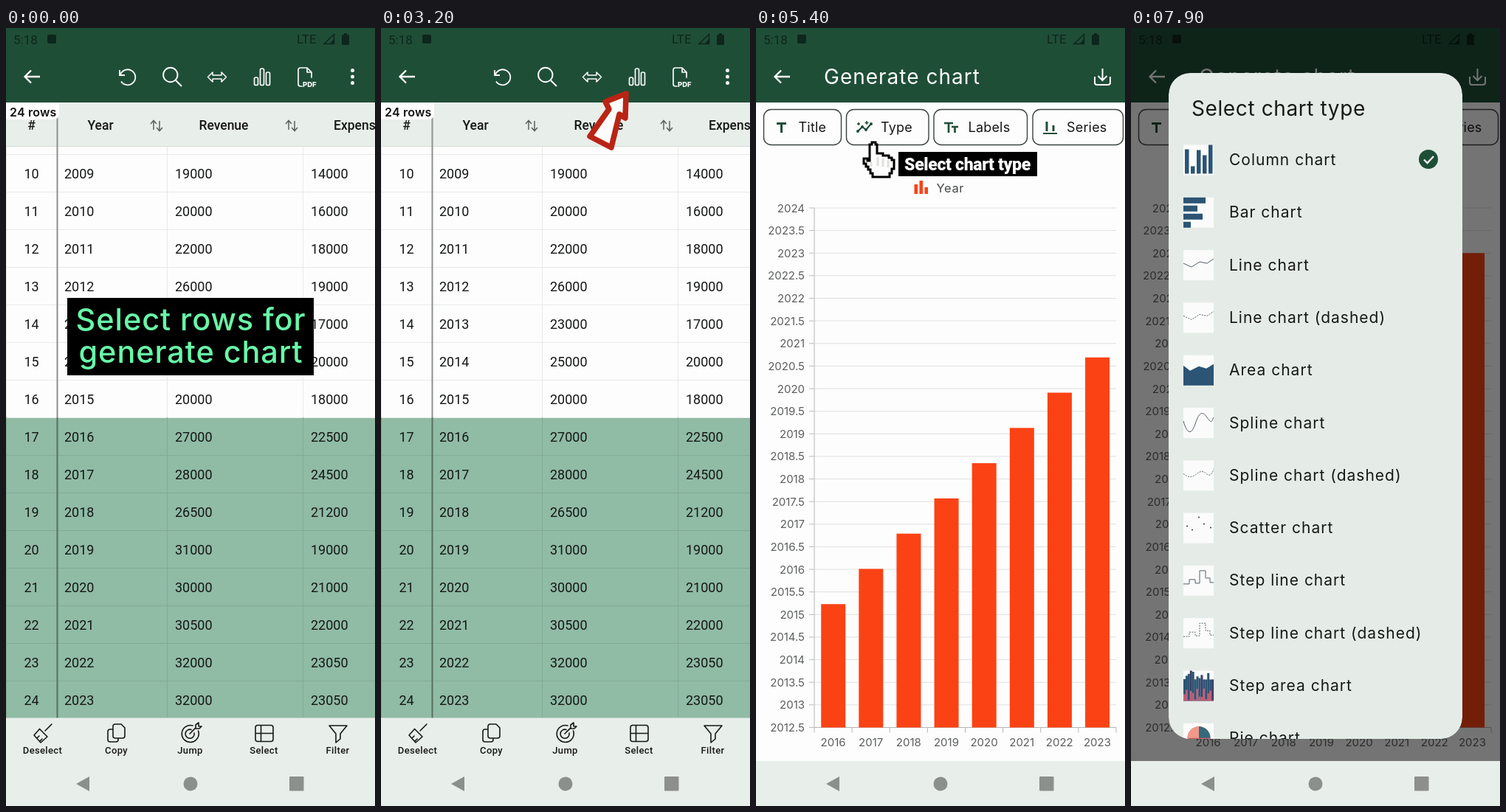
Write an HTML page that moves like this. It is 500 by 1055 pixels and loops after 8 s.

```html
<!DOCTYPE html>
<html lang="en">
<head>
<meta charset="utf-8">
<title>Generate chart</title>
<style>
html, body { margin: 0; width: 100%; height: 100%; overflow: hidden; background: #fdfdfd; }
svg { display: block; width: 100vw; height: 100vh; }
text { white-space: pre; }
.ui { font-family: Inter, sans-serif; }
.rb { font-family: Roboto, sans-serif; }
</style>
</head>
<body>
<script>
const GREEN = '#1f4e37', WHITE = '#fdfdfd', PANEL = '#e8eeea', INK = '#151816';
const BAR = '#fb4214', NAVY = '#2b5475', GREY = '#8b908c';
const LOOP = 8000;

const each = (list, fn) => list.map(fn).join('');
const range = (n, fn) => each([...Array(n).keys()], fn);
const rect = (x, y, w, h, fill, more = '') =>
  `<rect x="${x}" y="${y}" width="${w}" height="${h}" fill="${fill}" ${more}/>`;
const dot = (x, y, r, fill, more = '') =>
  `<circle cx="${x}" cy="${y}" r="${r}" fill="${fill}" ${more}/>`;
const line = (d, color, w = 1, more = '') =>
  `<path d="${d}" fill="none" stroke="${color}" stroke-width="${w}" ${more}/>`;
const shape = (d, fill, more = '') => `<path d="${d}" fill="${fill}" ${more}/>`;
const text = (x, y, s, size, fill, more = '', font = 'ui') =>
  `<text class="${font}" x="${x}" y="${y}" font-size="${size}" fill="${fill}" ${more}>${s}</text>`;
const group = (id, body, more = '') => `<g id="${id}" ${more}>${body}</g>`;
const MID = 'text-anchor="middle"', END = 'text-anchor="end"';
const ROUND = 'stroke-linecap="round" stroke-linejoin="round"';

// Shared phone chrome
const statusBar = () => {
  const ink = '#0e261b';
  return rect(0, 0, 500, 101, GREEN)
    + text(10, 22, '5:18', 17, ink, '', 'rb')
    + rect(56, 9, 12, 12, ink, 'rx="2"')
    + text(394, 21, 'LTE', 17, ink, '', 'rb')
    + line('M431 21.5H444.5V8.5Z', ink, 1.5) + shape('M438 22H445V14Z', ink)
    + rect(455, 9, 10, 14, ink, 'rx="1.5"') + rect(458, 7, 4, 3, ink);
};
const backArrow = line('M46 66H26M34 57.5L25.5 66L34 74.5', WHITE, 2.3);
const navBar = y => rect(0, y, 500, 1055 - y, PANEL)
  + shape('M95 1025L113 1015V1035Z', GREY)
  + dot(250, 1025, 9.5, GREY)
  + rect(384, 1015, 19.5, 19.5, GREY, 'rx="1"');

// Table screen
const revenue = [19, 20, 22, 26, 23, 25, 20, 27, 28, 26.5, 31, 30, 30.5, 32, 32];
const expense = [14, 16, 18, 19, 17, 20, 18, 22.5, 24.5, 21.2, 19, 21, 22, 23.05, 23.05];

const toolbar = line('M154 57V64H161M155 63A10.5 10.5 0 1 1 156 72.5', WHITE, 1.8)
  + line('M230 71L238 79', WHITE, 1.9) + dot(222.8, 63.5, 9.7, 'none', `stroke="${WHITE}" stroke-width="1.9"`)
  + line('M273.5 66.5L280 60V64H292V60L298.5 66.5L292 73V69H280V73Z', WHITE, 1.5, ROUND)
  + each([[336.5, 67], [344.5, 55], [352.5, 60]], ([x, y]) =>
      rect(x, y, 5, 77.5 - y, 'none', `rx="2" stroke="${WHITE}" stroke-width="1.7"`))
  + line('M401 79H399A3 3 0 0 1 396 76V57A3 3 0 0 1 399 54H408L414 60V67M408 54V60H414', WHITE, 1.7, ROUND)
  + text(402, 80, 'PDF', 9.5, WHITE, 'font-weight="800"')
  + each([57.5, 66, 74.5], y => dot(469.5, y, 2.5, WHITE));

const sortIcon = x => line(
  `M${x - 4} 138V125.5M${x - 8} 130L${x - 4} 125.5L${x} 130M${x + 4} 126V139.5M${x} 135L${x + 4} 139.5L${x + 8} 135`,
  '#5c615d', 1.5);

const tableGrid = () => {
  const rule = '#e6eae6', shade = '#82ab94';
  return rect(0, 160, 500, 776, WHITE) + rect(0, 528, 500, 408, '#90bba5')
    + range(15, i => line(`M0 ${171.5 + 51 * i}H500`, i > 7 ? shade : rule))
    + each([.5, 218.5, 402.5], x => line(`M${x} 160V528`, rule) + line(`M${x} 528V936`, shade))
    + range(15, i => {
        const cell = (x, s, more) => text(x, 203.5 + 51 * i, s, 18, INK, more, 'rb');
        return cell(34.5, 10 + i, MID) + cell(79, 2009 + i)
          + cell(229, revenue[i] * 1000) + cell(413, expense[i] * 1000);
      });
};

const heading = (x, s, more = '') => text(x, 137.5, s, 17.5, INK, more + ' font-weight="500"', 'rb');
const tableHead = rect(0, 101, 500, 59.5, PANEL) + line('M0 160.5H500', '#d8ded9')
  + heading(34.5, '#', MID) + heading(128, 'Year', MID) + heading(295, 'Revenue', MID)
  + heading(444, 'Expenses')
  + sortIcon(204) + sortIcon(387)
  + line('M69.5 101V528', '#8d918e', 2) + line('M69.5 528V936', '#56705f', 2)
  + shape('M0 101H72V116Q72 124 64 124H0Z', WHITE)
  + text(5, 119.5, '24 rows', 16, '#111', 'font-weight="600" letter-spacing=".2"');

const actions = [
  ['Deselect', 'M62 944L53 953M45.5 950.5L56 961M45.5 950.5L38 959L47 969L56 961M42 963L45 960M46 967L49 964'],
  ['Copy', 'M148 944H156L161 949V960A3 3 0 0 1 158 963H148A3 3 0 0 1 145 960V947A3 3 0 0 1 148 944M145 951H141A3 3 0 0 0 138 954V965A3 3 0 0 0 141 968H149A3 3 0 0 0 152 965V963'],
  ['Jump', 'M253 946A11.5 11.5 0 1 0 260.5 953M251 951.5A6 6 0 1 0 255 956M249 957L257 949V945L261 942V947H265L262 950H257'],
  ['Select', 'M341 945.5H359A3 3 0 0 1 362 948.5V964.5A3 3 0 0 1 359 967.5H341A3 3 0 0 1 338 964.5V948.5A3 3 0 0 1 341 945.5M345.5 945.5V967.5M338 956.5H362'],
  ['Filter', 'M438 946H462L453 957V964L447 969V957Z'],
];
const actionBar = rect(0, 935.5, 500, 70, PANEL)
  + each(actions, ([name, icon], i) => line(icon, INK, 1.6, ROUND)
    + text(49.5 + 100 * i, 984, name, 13, INK, MID + ' font-weight="500" letter-spacing=".35"', 'rb'));

const tableScreen = tableGrid() + tableHead + statusBar() + backArrow + toolbar + navBar(1000) + actionBar;

const caption = rect(83, 366, 334, 105, '#000')
  + each([['Select rows for', 409.5], ['generate chart', 454]], ([s, y]) =>
      text(250.5, y, s, 41.5, '#68f7a8', MID + ' font-weight="500" letter-spacing=".9"'));

const pointer = shape('M332 89L304 100L309 110L283 147L312 162L323 117L331 122Z', WHITE,
  'stroke="#b92414" stroke-width="7.5" stroke-linejoin="round"');

// Chart screen
const BASE = 948.5, STEP = 704.5 / 23, SLOT = 409 / 8;

const chip = (x, w, label, tx) =>
  rect(x, 110.5, w, 48, 'none', 'rx="10" stroke="#3c4440" stroke-width="1.4"')
  + text(tx, 141, label, 18, INK, 'letter-spacing=".2"');
const chips = chip(10.5, 105, 'Title', 57.5) + chip(122.5, 111.5, 'Type', 169)
  + chip(241, 126.5, 'Labels', 287.5) + chip(375, 122.5, 'Series', 421)
  + line('M28 129.5H41M34.5 129.5V142', GREEN, 3)
  + line('M138 140L144 134L149 138L156 130', GREEN, 2, ROUND)
  + each([[138, 140], [144, 134], [149, 138], [156, 130]], ([x, y]) => dot(x, y, 2, GREEN))
  + line('M139 128V132M137 130H141M150 126V131M147.5 128.5H152.5', GREEN, 1.5)
  + line('M255 129H267M261 129V142M265 134H274M269.5 134V142', GREEN, 2.7)
  + line('M389 143H408', GREEN, 2) + line('M394 127V140M403 132V140', GREEN, 3);

const axisText = (x, y, s, more) => text(x, y, s, 15, '#5c605d', more);
const axes = range(24, i => {
    const y = BASE - STEP * i;
    return line(`M79 ${y}H488`, '#dde0dd') + line(`M72 ${y}H79`, '#b9bcb9')
      + axisText(66, y + 5.5, 2012.5 + i / 2, END);
  })
  + line(`M79 244V${BASE}`, '#c8ccc8', 1.5)
  + line(`M79 ${BASE}H488`, '#b4b6b4', 1.2)
  + range(9, i => line(`M${79 + SLOT * i} ${BASE}v7`, '#b4b6b4'))
  + range(8, i => axisText(79 + SLOT * (i + .5), 974, 2016 + i, MID));

const chartScreen = rect(0, 0, 500, 1055, WHITE) + statusBar() + backArrow
  + text(92, 76, 'Generate chart', 28, WHITE, 'letter-spacing="1"')
  + line('M459 66V74A3 3 0 0 0 462 77H477A3 3 0 0 0 480 74V66M469.5 55V70M463.5 65L469.5 71L475.5 65', WHITE, 2)
  + chips
  + rect(214.5, 212, 4.5, 13, BAR) + rect(221.5, 207, 4.5, 18, BAR) + rect(228.5, 216, 4.5, 9, BAR)
  + text(244.5, 222.5, 'Year', 16.5, '#464a47', 'letter-spacing=".6"')
  + axes
  + range(8, i => rect(88.2 + SLOT * i, BASE, 33, 0, BAR, 'class="bar"'))
  + navBar(994);

// Chart type dialog
const curve = (d, more) => line(d, '#55606a', 1, more);
const DASH = 'stroke-dasharray="2 1.5"';
const lineD = 'M0 18L11 23L22 16L32 18L41 12';
const stepD = 'M0 25H8V19H16V24H22V7H30V17H36V23H41';
const types = [
  ['Column chart', each([[2, 33], [10, 10], [18, 32], [26, 25], [34, 39]], ([x, h]) => rect(x, 39 - h, 5.5, h, NAVY))],
  ['Bar chart', each([30, 19, 26, 10], (w, i) => rect(0, 11 * i, w, 8, NAVY))],
  ['Line chart', curve(lineD)],
  ['Line chart (dashed)', curve(lineD, DASH)],
  ['Area chart', shape('M0 14L9 21L21 15L31 18L41 12V41H0Z', NAVY)],
  ['Spline chart', curve('M0 18C5 36 11 37 16 22S25 3 32 13S38 18 41 13')],
  ['Spline chart (dashed)', curve('M0 18Q9 26 17 19T31 18T41 12', DASH)],
  ['Scatter chart', each([[5, 18], [12, 23], [21, 6], [28, 15], [37, 20]], ([x, y]) => dot(x, y, 1, '#333'))],
  ['Step line chart', curve(stepD)],
  ['Step line chart (dashed)', curve(stepD, DASH)],
  ['Step area chart', range(14, i => {
    const top = 6 + 6 * Math.sin(i * i + 2), red = 9 + 8 * Math.sin(i * 2.3);
    return rect(i * 2.93, top, 3, 41 - top, i % 5 == 3 ? '#3d3f63' : NAVY)
      + rect(i * 2.93, 41 - red, 3, red, '#bf6078');
  })],
  ['Pie chart', dot(21, 20, 15.5, '#d0606a') + shape('M21 20V4.5A15.5 15.5 0 0 0 5.5 20Z', '#f0988a')
    + shape('M21 20V4.5A15.5 15.5 0 0 1 36.5 20Z', '#346a7c')],
];
const dialog = rect(51, 61, 398, 903, '#e5ece8', 'rx="29"')
  + text(82, 119, 'Select chart type', 28, INK, 'letter-spacing=".6"')
  + each(types, ([name, icon], i) => {
      const y = 179 + 71.3 * i;
      return `<g transform="translate(71 ${y - 20.5})">${rect(0, 0, 41, 41, '#fafbfa')}${icon}</g>`
        + text(133, y + 7, name, 21, INK, 'letter-spacing="1"');
    })
  + dot(403, 178, 13, GREEN) + line('M397 178.5L401.5 183L410 174', WHITE, 2.3);

const hand = shape('M157 155H162V158H164V170H172V173H180V176H184V179H187V191H184V197H181V202H158V197H155V192H152V188H149V184H146V177H151V180H154V158H157Z',
    WHITE, 'stroke="#000" stroke-width="3"')
  + line('M165 175V187M172 177V188M179 179V189M156 182V188', '#dfe0dc', 3)
  + rect(193, 168, 188, 33, '#000')
  + text(286.5, 192.5, 'Select chart type', 23, '#fff', MID + ' font-weight="800" letter-spacing="-.35"', 'rb');

document.body.innerHTML = `<svg viewBox="0 0 500 1055" preserveAspectRatio="none">
  <clipPath id="panel">${rect(51, 61, 398, 903, '#fff', 'rx="29"')}</clipPath>
  ${tableScreen}${group('caption', caption)}${group('pointer', pointer)}
  ${group('chart', chartScreen)}${rect(0, 0, 500, 994, '#000', 'id="dim"')}
  ${group('dialog', dialog, 'clip-path="url(#panel)"')}${group('hand', hand)}
</svg>`;

const el = id => document.getElementById(id);
const bars = document.querySelectorAll('.bar');
const fade = (id, a) => {
  el(id).style.opacity = a;
  el(id).style.display = a > 0 ? '' : 'none';
};
const part = (t, start, span) => Math.min(1, Math.max(0, (t - start) / span));

function draw(now) {
  const t = now % LOOP;
  fade('caption', +(t < 2200));
  fade('pointer', +(t >= 2200 && t < 4250));
  fade('chart', part(t, 4050, 200));
  fade('hand', +(t >= 4400 && t < 7300));

  const grow = 1 - (1 - part(t, 4254, 2160)) ** 2;
  bars.forEach((bar, i) => {
    const h = STEP * (7 + 2 * i) * grow;
    bar.setAttribute('y', BASE - h);
    bar.setAttribute('height', h);
  });

  const open = part(t, 6700, 280);
  fade('dialog', open);
  fade('dim', .54 * (1 - (1 - open) ** 1.3));
  requestAnimationFrame(draw);
}
draw(performance.now());
</script>
</body>
</html>
```
